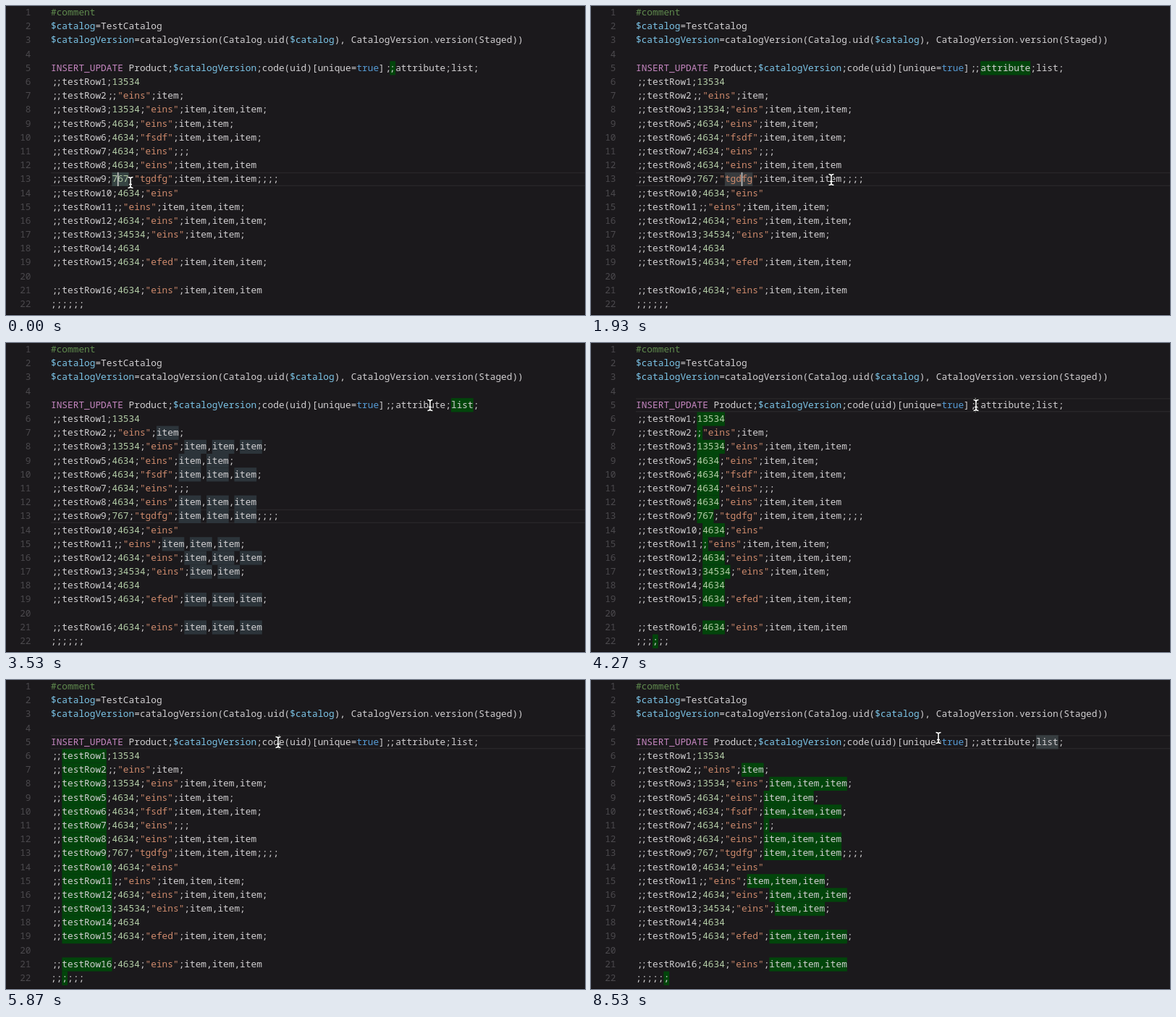
An HTML page with a canvas for the animation above (8.59 s loop, 800 px wide and 427 px high).

```html
<!DOCTYPE html>
<html lang="en">
<head>
<meta charset="utf-8">
<title>Column highlighting in an editor</title>
<style>
  html, body { margin: 0; width: 100%; height: 100%; overflow: hidden; background: #1b191c; }
  canvas { display: block; }
</style>
</head>
<body>
<canvas id="stage" width="800" height="427"></canvas>
<script>
const ctx = document.getElementById('stage').getContext('2d');
const LOOP = 8590, LEFT = 62, CHAR = 7.68, LINE = 19.2, HEADER = 5;

const lines = `#comment
$catalog=TestCatalog
$catalogVersion=catalogVersion(Catalog.uid($catalog), CatalogVersion.version(Staged))

INSERT_UPDATE Product;$catalogVersion;code(uid)[unique=true];;attribute;list;
;;testRow1;13534
;;testRow2;;"eins";item;
;;testRow3;13534;"eins";item,item,item;
;;testRow5;4634;"eins";item,item;
;;testRow6;4634;"fsdf";item,item,item;
;;testRow7;4634;"eins";;;
;;testRow8;4634;"eins";item,item,item
;;testRow9;767;"tgdfg";item,item,item;;;;
;;testRow10;4634;"eins"
;;testRow11;;"eins";item,item,item;
;;testRow12;4634;"eins";item,item,item;
;;testRow13;34534;"eins";item,item;
;;testRow14;4634
;;testRow15;4634;"efed";item,item,item;

;;testRow16;4634;"eins";item,item,item
;;;;;;`.split('\n');

// Each click places the caret; the word under it lights up a little later.
const clicks = [
  { at: -300, row: 13, col: 12, field: 3, word: '767', shade: '#364443' },
  { at: 500, row: 13, col: 19, field: 4, word: 'tgdfg', shade: '#383c3f' },
  { at: 2030, row: 13, col: 35, field: 5, word: 'item', shade: '#2c343a' },
  { at: 3800, row: 5, col: 61, field: 3 },
  { at: 5800, row: 5, col: 41, field: 2, word: 'code', shade: '#3a4244' },
  { at: 7650, row: 5, col: 74, field: 5, word: 'list', shade: '#373d40' }
];

// Mouse path: time, x, y
const path = [
  [0, 172, 244], [70, 172, 244], [450, 212, 240], [1300, 212, 240],
  [1850, 332, 240], [2250, 332, 240], [2600, 340, 132], [2950, 617, 86],
  [3400, 617, 86], [3720, 532, 86], [4400, 532, 86], [4750, 168, 108],
  [5200, 170, 250], [5700, 376, 86], [6130, 376, 86], [6500, 110, 108],
  [6900, 112, 250], [7200, 622, 79], [7500, 629, 86], [8150, 629, 86],
  [8530, 480, 80], [LOOP, 480, 80]
];

const syntax = [
  [/#.*/g, '#608b4e'],
  [/\$\w+/g, '#7cc5e8'],
  [/"[^"]*"/g, '#ce8a6c'],
  [/INSERT_UPDATE/g, '#c586c0'],
  [/\btrue\b/g, '#569cd6'],
  [/\b\d+\b/g, '#b5cea8']
];

const colX = col => LEFT + col * CHAR;
const midY = row => 9 + (row - 1) * LINE;

function block(row, col, length, color) {
  ctx.fillStyle = color;
  ctx.fillRect(colX(col), midY(row) - 9.6, length * CHAR, LINE);
}

function markField(row, index) {
  const text = lines[row - 1], fields = text.split(';');
  const start = fields.slice(0, index).join(';').length + 1;
  if (start < text.length) block(row, start, fields[index].length || 1, '#02450b');
}

function markWord(word, color) {
  lines.forEach((text, i) => {
    for (const m of text.matchAll(new RegExp('\\b' + word + '\\b', 'g')))
      block(i + 1, m.index, word.length, color);
  });
}

function drawText(text, row) {
  const colors = Array(text.length).fill('#d2d0d2');
  const shift = Array(text.length).fill(0);
  for (const [pattern, color] of syntax)
    for (const m of text.matchAll(pattern))
      colors.fill(color, m.index, m.index + m[0].length);
  // An isolated pair of semicolons is set tighter.
  for (const m of text.matchAll(/(?<!;);;(?!;)/g)) {
    shift[m.index] = 1.7;
    shift[m.index + 1] = -0.5;
  }
  const y = Math.floor(midY(row) + 4.4);
  [...text].forEach((c, i) => {
    ctx.fillStyle = colors[i];
    ctx.fillText(c, colX(i) + shift[i], y);
  });
  ctx.fillStyle = '#4b494d';
  ctx.fillText(row, 34.5 - CHAR * String(row).length, y);
}

function mouseAt(t) {
  const i = Math.max(1, path.findIndex(p => p[0] >= t));
  const [t0, x0, y0] = path[i - 1], [t1, x1, y1] = path[i];
  const k = (t - t0) / (t1 - t0), e = k * k * (3 - 2 * k);
  return [x0 + (x1 - x0) * e, y0 + (y1 - y0) * e];
}

function drawMouse([x, y]) {
  ctx.beginPath();
  for (const s of [-1, 1]) {
    ctx.moveTo(x - 3.5, y + s * 7.5);
    ctx.quadraticCurveTo(x, y + s * 7.5, x, y + s * 5);
    ctx.quadraticCurveTo(x, y + s * 7.5, x + 3.5, y + s * 7.5);
  }
  ctx.moveTo(x, y - 6);
  ctx.lineTo(x, y + 6);
  ctx.moveTo(x - 2, y + 2.5);
  ctx.lineTo(x + 2, y + 2.5);
  for (const [width, color] of [[3.6, '#111'], [1.6, '#fff']]) {
    ctx.lineWidth = width;
    ctx.strokeStyle = color;
    ctx.stroke();
  }
}

function draw(t) {
  const state = clicks.findLast(c => c.at <= t);
  const age = t - state.at, top = midY(state.row) - 9.6;
  ctx.fillStyle = '#1b191c';
  ctx.fillRect(0, 0, 800, 427);
  ctx.fillStyle = '#282629';
  ctx.fillRect(LEFT, top, 738, 1.4);
  ctx.fillRect(LEFT, top + LINE - 1.4, 738, 1.4);

  if (state.row === HEADER)
    for (let row = HEADER + 1; row <= lines.length; row++) markField(row, state.field);
  else markField(HEADER, state.field);
  if (state.word && age > 250) markWord(state.word, state.shade);

  ctx.font = '12.8px "Noto Sans Mono", "DejaVu Sans Mono", monospace';
  lines.forEach((text, i) => drawText(text, i + 1));
  if (age % 1000 < 500) {
    ctx.fillStyle = '#c4c4c2';
    ctx.fillRect(colX(state.col) - 0.2, top, 1.6, LINE);
  }
  ctx.fillStyle = '#130f13';
  ctx.fillRect(0, 426, 800, 1);
  drawMouse(mouseAt(t));
}

const start = performance.now();
function frame() {
  draw((performance.now() - start) % LOOP);
  requestAnimationFrame(frame);
}
frame();
</script>
</body>
</html>
```
